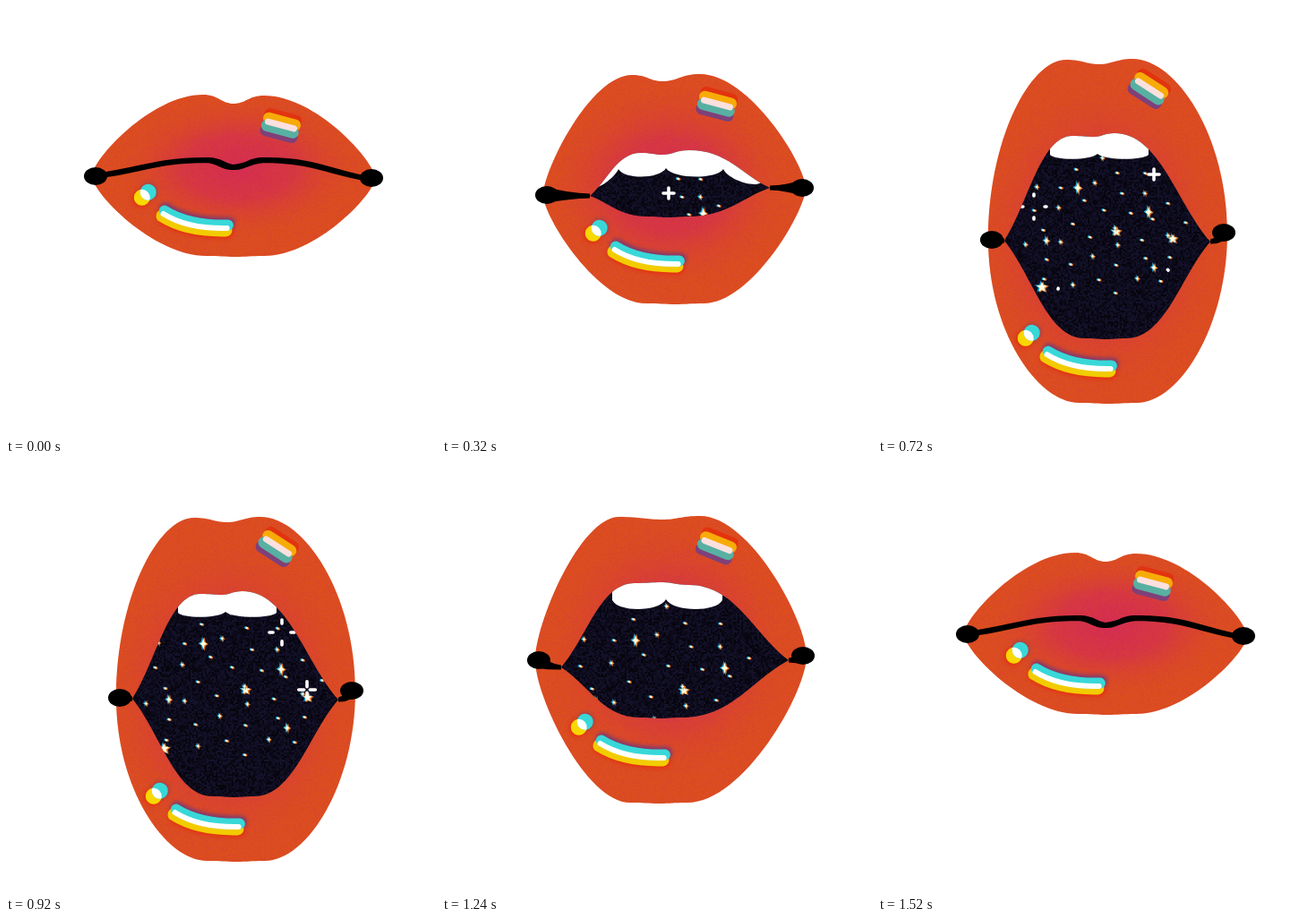
Recreate the animation shown at these times as an HTML page with a canvas. Size 480 px wide and 480 px high, loop 1.68 s.

```html
<!DOCTYPE html>
<html>
<head>
<meta charset="utf-8">
<style>
html, body { margin: 0; height: 100%; overflow: hidden; background: #fff; }
canvas { display: block; width: 480px; height: 480px; }
</style>
</head>
<body>
<canvas id="stage" width="480" height="480"></canvas>
<script>
const ctx = document.getElementById('stage').getContext('2d');
const LOOP = 1680, STEP = 40;

// corners: left and right point; crest and arch: left peak, dip, right peak;
// floor: x, y, rise of its sides; teeth: y, bite depth, how far molars show
const closed = {
  corners: [96,190, 412,192], crest: [220,99, 254,109, 288,100], chin: [256,280], bulge: [.2],
  inner: [112,188, 400,192], arch: [222,172, 252,180, 292,172], floor: [256,180,8],
  teeth: [178,0,0], shine: [15], gloss: [155,211], line: [6]
};
const parted = {
  corners: [113,211, 406,203], crest: [212,77, 246,84, 288,76], chin: [260,333], bulge: [.2],
  inner: [165,212, 366,203], arch: [222,164, 246,166, 276,161], floor: [252,236,1],
  teeth: [182,12,1], shine: [15], gloss: [172,251], line: [0]
};
const open = {
  corners: [122,265, 400,257], crest: [212,72, 241,80, 280,72], chin: [250,422], bulge: [.5],
  inner: [144,268, 379,250], arch: [212,161, 245,164, 278,160], floor: [266,332,1],
  teeth: [177,10,0], shine: [15], gloss: [168,332], line: [0]
};
const wide = {
  corners: [123,261, 390,253], crest: [210,60, 247,65, 284,59], chin: [257,444], bulge: [.55],
  inner: [141,262, 371,263], arch: [217,145, 241,146, 264,142], floor: [254,372,1],
  teeth: [166,7,0], shine: [33], gloss: [168,368], line: [0]
};
const closing = {
  corners: [104,219, 407,214], crest: [198,59, 246,62, 288,58], chin: [242,379], bulge: [.25],
  inner: [133,227, 387,219], arch: [215,133, 246,132, 275,135], floor: [244,284,1],
  teeth: [152,14,0], shine: [22], gloss: [156,291], line: [0]
};

const easeIn = u => u ** 1.4, easeOut = u => 1 - (1 - u) ** 2, linear = u => u;
// time, pose, easing towards that pose
const keys = [
  [0, closed], [40, closed, linear], [320, parted, easeIn], [480, open, linear],
  [640, wide, easeOut], [1120, wide, linear], [1240, closing, easeIn],
  [1520, closed, linear], [LOOP, closed, linear]
];

function poseAt(t) {
  const i = keys.findIndex(k => k[0] > t);
  const [t0, a] = keys[i - 1], [t1, b, ease] = keys[i];
  const u = ease((t - t0) / (t1 - t0)), pose = {};
  for (const part in a) pose[part] = a[part].map((v, j) => v + (b[part][j] - v) * u);
  return pose;
}

const pairs = list => Array.from({ length: list.length / 2 }, (_, i) => [list[2 * i], list[2 * i + 1]]);

// Lip edge from corner to corner over two peaks and a dip; lean and rise aim the corner handles
function bow(path, from, [p, d, q], to, lean, rise) {
  const corner = (c, k) => [c[0] + (k[0] - c[0]) * lean, c[1] + (k[1] - c[1]) * rise];
  const flat = (a, b, k) => [a[0] + (b[0] - a[0]) * k, a[1]];
  path.bezierCurveTo(...corner(from, p), ...flat(p, from, .47), ...p);
  path.bezierCurveTo(...flat(p, d, .5), ...flat(d, p, .4), ...d);
  path.bezierCurveTo(...flat(d, q, .4), ...flat(q, d, .5), ...q);
  path.bezierCurveTo(...flat(q, to, .47), ...corner(to, q), ...to);
}

function ring([left, right], upper, [x, y], spread, lift, lean, rise) {
  const path = new Path2D();
  path.moveTo(...left);
  bow(path, left, upper, right, lean, rise);
  bow(path, right, [[x + spread, y - lift], [x, y], [x - spread, y - lift]], left, lean, rise);
  return path;
}

let seed = 11;
const random = () => (seed = (seed * 16807) % 2147483647) / 2147483647;

function grain(cell, color) {
  const tile = document.createElement('canvas');
  tile.width = tile.height = 240;
  const g = tile.getContext('2d');
  for (let y = 0; y < 240; y += cell)
    for (let x = 0; x < 240; x += cell) {
      g.fillStyle = color(random());
      g.fillRect(x, y, cell, cell);
    }
  return ctx.createPattern(tile, 'repeat');
}
const skinGrain = grain(1, r => r < .5 ? `rgba(225,85,20,${r * .35})` : `rgba(190,35,95,${(r - .5) * .35})`);
const nightGrain = grain(2, r => r < .3 ? '#07060f' : r < .7 ? '#0d0b1c' : '#131129');

function disc(x, y, r) {
  ctx.beginPath();
  ctx.arc(x, y, r, 0, 7);
  ctx.fill();
}

const star = (tips, waist, squash) => (x, y, r) => {
  ctx.beginPath();
  for (let i = 0; i < tips * 2; i++) {
    const a = i * Math.PI / tips - Math.PI / 2, d = i % 2 ? r * waist : r;
    ctx.lineTo(x + Math.cos(a) * d * squash, y + Math.sin(a) * d);
  }
  ctx.fill();
};
const sparkle = star(4, .4, .55), fiveStar = star(5, .45, 1);

// The brightest stars by hand, the small ones scattered
const sky = [
  [sparkle, 223,203,8], [sparkle, 302,230,8], [sparkle, 188,262,6], [sparkle, 308,292,6],
  [fiveStar, 266,252,6], [fiveStar, 329,260,6], [fiveStar, 183,314,7]
];
for (let i = 0; i < 38; i++) {
  const a = i * 2.4, d = Math.sqrt((i + random()) / 38);
  sky.push([i % 3 ? disc : sparkle, 250 + Math.cos(a) * d * 98, 248 + Math.sin(a) * d * 80, i % 3 ? 1.5 : 4]);
}

// Colour-split copies under a pale core
function fringed(shape, x, y, r) {
  for (const [color, shift, size] of [['#1fa6d0', -1.2, r], ['#e8741c', 1.2, r], ['#fffde0', 0, r * .85]]) {
    ctx.fillStyle = color;
    shape(x + shift, y + shift / 3, size);
  }
}

function segment(x0, y0, x1, y1) {
  ctx.beginPath();
  ctx.moveTo(x0, y0);
  ctx.lineTo(x1, y1);
  ctx.stroke();
}

// A plus that breaks into four arms and flies apart
function drawBurst(x, y, age) {
  if (age < 40 || age > 340) return;
  const inner = Math.max(0, (age - 100) * .055), outer = Math.min(14, inner + Math.min(6, age * .1));
  for (const [dx, dy] of [[1, 0], [-1, 0], [0, 1], [0, -1]])
    segment(x + dx * inner, y + dy * inner, x + dx * outer, y + dy * outer);
}

function drawStreak(x, y, dx, dy, age) {
  if (age < 0 || age > 300) return;
  const rest = Math.min(1, Math.max(.05, 1.4 - age / 100));
  segment(x - dx * rest, y - dy * rest, x, y);
}

function drawSky(t) {
  const sx = 1 + (t - 720) * .0005, sy = 1 + (t - 720) * .00028;
  for (const [shape, x, y, r] of sky) {
    const px = 250 + (x - 250) * sx, py = 245 + (y - 245) * sy;
    if (px > 582 - t) fringed(shape, px, py, r);
  }
  ctx.strokeStyle = '#fff';
  ctx.lineCap = 'round';
  ctx.lineWidth = 3.6;
  drawBurst(253, 209, t - 240);
  drawBurst(174, 224, t - 400);
  drawBurst(308, 188, t - 640);
  drawBurst(336, 252, t - 760);
  drawStreak(324, 295, 13, 14, t - 440);
  drawStreak(201, 316, -4, 17, t - 440);
}

function drawTeeth([p, d, q], [y, depth, molars]) {
  const edge = [[p[0] - 25 - 30 * molars, y + 18 * molars], [p[0] - 25, y], [d[0] + 4, y - 1],
    [q[0] + 38, y], [q[0] + 38 + 45 * molars, y + 12 * molars]];
  ctx.beginPath();
  ctx.moveTo(edge[0][0], 0);
  ctx.lineTo(...edge[0]);
  for (let i = 1; i < edge.length; i++) {
    const [x0, y0] = edge[i - 1], [x1, y1] = edge[i], w = x1 - x0;
    const drop = depth * Math.min(1, w / 40);
    ctx.bezierCurveTo(x0 + w * .12, y0 + drop, x1 - w * .12, y1 + drop, x1, y1);
  }
  ctx.lineTo(edge[4][0], 0);
  ctx.fillStyle = '#fff';
  ctx.fill();
}

function drawBlob(x, y, [cx, cy]) {
  const mid = (x + cx) / 2;
  ctx.fillStyle = '#000';
  ctx.beginPath();
  ctx.ellipse(x, y, 13, 10, 0, 0, 7);
  ctx.fill();
  ctx.beginPath();
  ctx.moveTo(x, y - 9);
  ctx.quadraticCurveTo(mid, cy - 3, cx, cy - 2.5);
  ctx.lineTo(cx, cy + 2.5);
  ctx.quadraticCurveTo(mid, cy + 3, x, y + 9);
  ctx.fill();
}

function local(x, y, degrees, draw) {
  ctx.save();
  ctx.translate(x, y);
  ctx.rotate(degrees * Math.PI / 180);
  ctx.lineCap = 'round';
  draw();
  ctx.restore();
}

function drawShine() {
  for (const [color, y, width] of [
    ['#e2330f', -9, 13], ['#7f4079', 10, 13], ['#f7ab07', -4, 13], ['#58b0a2', 4.5, 13], ['#fbe0de', 0, 7]
  ]) {
    ctx.strokeStyle = color;
    ctx.lineWidth = width;
    segment(-15, y, 15, y);
  }
}

function drawGloss() {
  const bar = (color, dx, dy, width) => {
    ctx.strokeStyle = color;
    ctx.lineWidth = width;
    ctx.beginPath();
    ctx.moveTo(23 + dx, 17 + dy);
    ctx.quadraticCurveTo(51 + dx, 32 + dy, 95 + dx, 28 + dy);
    ctx.stroke();
  };
  const ball = (color, x, y, r) => {
    ctx.fillStyle = color;
    disc(x, y, r);
  };
  ctx.filter = 'blur(2px)';
  ball('#e5300f', -4, 4, 10);
  ball('#9a4450', 4, -4, 10);
  bar('#e5300f', -1, 6, 16);
  bar('#7f3a6e', 1, -3, 14);
  ctx.filter = 'none';
  ball('#f8d800', -3, 3, 9);
  ball('#38d8d8', 3.5, -3.5, 9);
  bar('#f2cc00', -2, 5, 14);
  bar('#38d8d8', 0, -1, 12);
  bar('#fff', -1, 2.5, 6);
  ctx.beginPath();
  ctx.arc(-3, 3, 9, 0, 7);
  ctx.clip();
  ball('#fff', 3.5, -3.5, 9);
}

function fillInside(path, ...paints) {
  ctx.save();
  ctx.clip(path);
  for (const paint of paints) {
    ctx.fillStyle = paint;
    ctx.fillRect(0, 0, 480, 480);
  }
}

function drawLips(outline, x, y, rx, ry) {
  fillInside(outline, '#dc4e20');
  ctx.save();
  ctx.translate(x, y);
  ctx.scale(rx, ry);
  const glow = ctx.createRadialGradient(0, 0, 0, 0, 0, 1);
  glow.addColorStop(0, 'rgba(212,44,84,1)');
  glow.addColorStop(.45, 'rgba(213,50,76,.8)');
  glow.addColorStop(1, 'rgba(220,78,32,0)');
  ctx.fillStyle = glow;
  ctx.fillRect(-1, -1, 2, 2);
  ctx.restore();
  ctx.fillStyle = skinGrain;
  ctx.fillRect(0, 0, 480, 480);
  ctx.restore();
}

function draw(t) {
  const pose = poseAt(t);
  const corners = pairs(pose.corners), inner = pairs(pose.inner);
  const crest = pairs(pose.crest), arch = pairs(pose.arch);
  const { chin, floor, gloss, bulge: [bulge], line: [line] } = pose;
  const outline = ring(corners, crest, chin, 32, 1, 0, bulge);
  const mouth = ring(inner, arch, floor, 22 + floor[2], floor[2], .35, .35);

  ctx.fillStyle = '#fff';
  ctx.fillRect(0, 0, 480, 480);
  drawLips(outline, arch[1][0] + 8, (arch[1][1] + floor[1]) / 2, 140, (chin[1] - crest[0][1]) / 2 - 10);

  fillInside(mouth, nightGrain);
  drawSky(t);
  drawTeeth(arch, pose.teeth);
  ctx.restore();

  if (line > 0) {
    ctx.strokeStyle = '#000';
    ctx.lineWidth = line;
    ctx.lineJoin = 'round';
    ctx.stroke(mouth);
  }
  const [left, right] = corners;
  drawBlob(left[0] + 4, left[1], inner[0]);
  drawBlob(right[0] - 4, right[1], inner[1]);
  local(crest[2][0] + 19, crest[2][1] + 33, pose.shine[0], drawShine);
  local(...gloss, 4, drawGloss);
}

const start = performance.now();
function tick() {
  const t = (performance.now() - start) % LOOP;
  draw(Math.floor(t / STEP) * STEP);
  requestAnimationFrame(tick);
}
tick();
</script>
</body>
</html>
```
